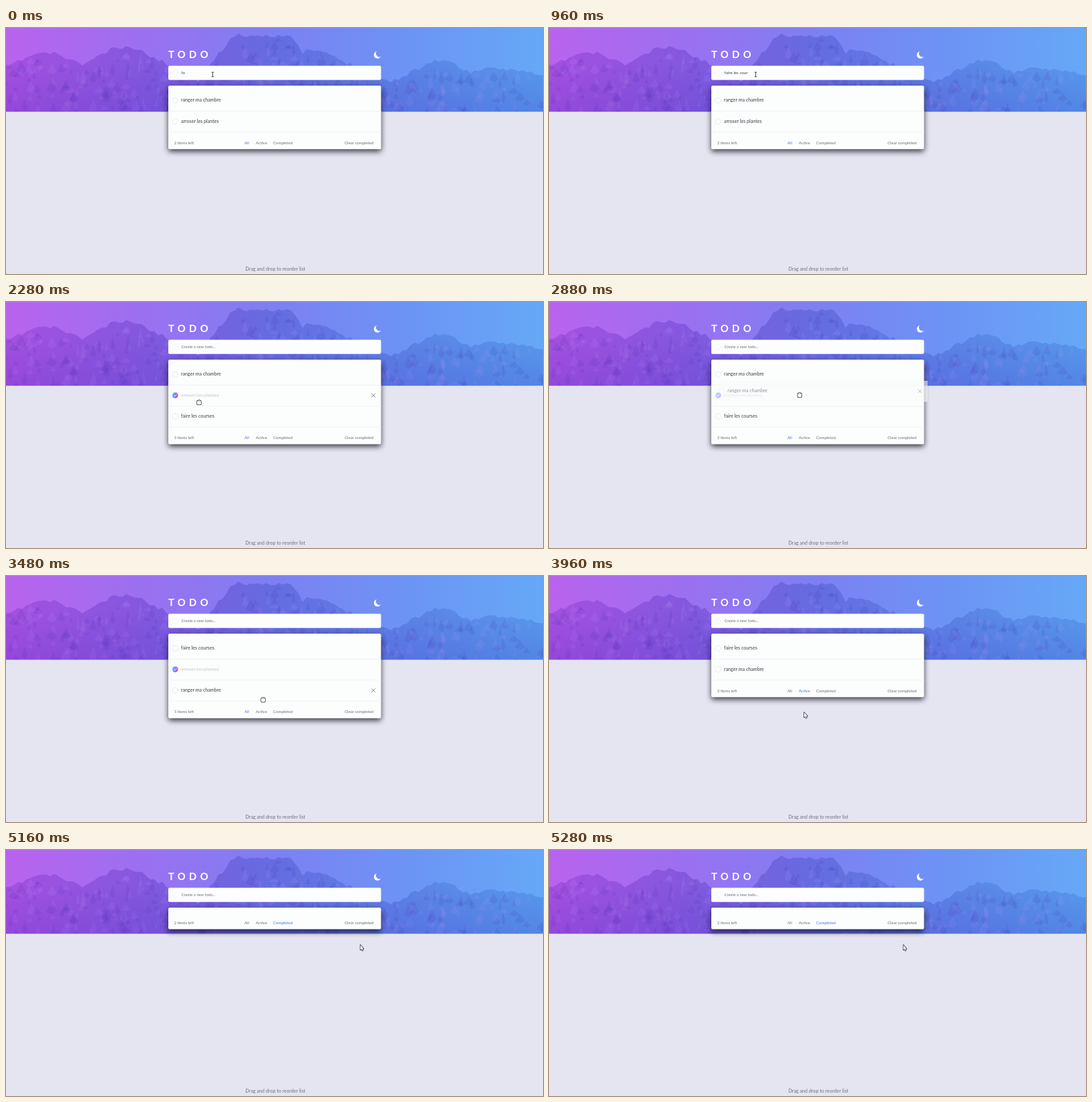
These frames come from a looping animation (804 px wide and 368 px high, 5.4 s). An HTML page with a canvas:

```html
<!DOCTYPE html>
<html lang="en">
<head>
<meta charset="utf-8">
<title>Todo</title>
<style>
html, body { margin: 0; width: 100%; height: 100%; overflow: hidden; background: #e4e5f1; }
canvas { display: block; width: 804px; height: 368px; }
</style>
</head>
<body>
<canvas id="stage"></canvas>
<script>
const W = 804, H = 368, LOOP = 5400, STEP = 120;
const LEFT = 243, RIGHT = 561.5, ROW = 31.4, LIST = 93, SKY = 125.3;
const FONT = 'Lato, "Open Sans", sans-serif';
const INK = '#3c3e49', SOFT = '#6c6e7b', BLUE = '#4777d6', DARK = '#24252b';
const room = { text: 'ranger ma chambre' };
const plants = { text: 'arroser les plantes' };
const shop = { text: 'faire les courses' };

// Moments of each user action, in ms
const AT = { submit: 1320, check: 2040, grab: 2640, drop: 3240, active: 3840, completed: 4560, clear: 5160 };

const HOME = [309.5, 69.5];
// Pointer moves: start, end, then where to
const MOVES = [
  [1560, 1920, 253, 139], [2160, 2280, 289, 150], [2280, 2640, 370, 114], [2640, 3240, 385, 185],
  [3600, 3720, 382, 204], [4080, 4320, 413.5, 172.5], [4680, 5040, 530.5, 142]
];
const LINKS = [['All', 357], ['Active', 374], ['Completed', 400], ['Clear completed', 507]];
// Peaks: centre, top, half width of the flat top, steepness
const PEAKS = [[60, 38, 15, 0.45], [178, 30, 15, 0.5], [382, 11, 42, 1.3], [460, 34, 10, 0.45],
  [650, 48, 8, 0.5], [740, 62, 30, 0.3]];

const stage = document.getElementById('stage');
const ratio = window.devicePixelRatio || 1;

function setUp(canvas) {
  canvas.width = W * ratio;
  canvas.height = H * ratio;
  const c = canvas.getContext('2d');
  c.scale(ratio, ratio);
  c.lineJoin = c.lineCap = 'round';
  return c;
}
const ctx = setUp(stage);
const backdrop = document.createElement('canvas');

function ramp(c, x0, y0, x1, y1, colors) {
  const g = c.createLinearGradient(x0, y0, x1, y1);
  colors.forEach((col, i) => g.addColorStop(i / (colors.length - 1), col));
  return g;
}

function label(c, str, x, y, size, color, weight = 400, spacing = 0) {
  c.font = `${weight} ${size}px ${FONT}`;
  c.fillStyle = color;
  c.letterSpacing = spacing + 'px';
  c.fillText(str, x, y);
  c.letterSpacing = '0px';
}

function line(color, width, x0, y0, x1, y1) {
  ctx.beginPath();
  ctx.moveTo(x0, y0);
  ctx.lineTo(x1, y1);
  ctx.strokeStyle = color;
  ctx.lineWidth = width;
  ctx.stroke();
}

function ring(x, y, color) {
  ctx.beginPath();
  ctx.arc(x, y, 4.1, 0, Math.PI * 2);
  ctx.strokeStyle = color;
  ctx.lineWidth = 0.7;
  ctx.stroke();
}

function panel(top, bottom, shadow) {
  ctx.save();
  if (shadow) {
    ctx.shadowColor = 'rgba(12,12,20,.8)';
    ctx.shadowBlur = 9 * ratio;
    ctx.shadowOffsetY = 3.5 * ratio;
  }
  ctx.fillStyle = '#fcfdfd';
  ctx.beginPath();
  ctx.roundRect(LEFT, top, RIGHT - LEFT, bottom - top, 2);
  ctx.fill();
  ctx.restore();
}

function skyline(x) {
  return Math.min(SKY, ...PEAKS.map(([px, top, half, steep]) =>
    top + Math.max(0, Math.abs(x - px) - half) * steep));
}

function paintBackdrop() {
  const c = setUp(backdrop);
  let seed = 11;
  const rnd = () => (seed = seed * 16807 % 2147483647) / 2147483647;
  c.fillStyle = '#e4e5f1';
  c.fillRect(0, 0, W, H);
  c.fillStyle = ramp(c, 0, 0, W, 0, ['#b963ee', '#9c70f0', '#7d80f2', '#6c94f5', '#66a8f7']);
  c.fillRect(0, 0, W, SKY);

  c.save();
  c.beginPath();
  c.moveTo(0, SKY);
  for (let x = 0; x <= W; x += 6) c.lineTo(x, skyline(x) + (rnd() - 0.5) * 6);
  c.lineTo(W, SKY);
  c.clip();
  c.fillStyle = ramp(c, 0, 0, W, 0, ['#a550df', '#8458de', '#656ce0', '#5c84e6', '#579aec']);
  c.fillRect(0, 0, W, SKY);
  // Craggy streaks, shaded and lit
  for (let i = 0; i < 420; i++) {
    const x = rnd() * W, y = skyline(x) + rnd() * 85, w = 2 + rnd() * 6, h = 5 + rnd() * 17;
    c.fillStyle = rnd() < 0.55 ? 'rgba(50,30,160,.1)' : 'rgba(200,170,255,.1)';
    c.beginPath();
    c.moveTo(x, y);
    c.lineTo(x + w, y + h * 0.7);
    c.lineTo(x + w * 0.3, y + h);
    c.lineTo(x - w, y + h * 0.8);
    c.fill();
  }
  c.fillStyle = ramp(c, 0, 50, 0, SKY, ['rgba(60,30,190,0)', 'rgba(60,30,190,.16)']);
  c.fillRect(0, 0, W, SKY);
  c.restore();

  label(c, 'TODO', 243, 44.6, 14.8, '#fff', 700, 5.3);
  c.fillStyle = '#fff';
  c.fill(new Path2D('M555 35.1A5.4 5.4 0 1 0 561 42.8A5 5 0 0 1 555 35.1'));
  label(c, 'Drag and drop to reorder list', 358.5, 362.5, 7, SOFT, 400, 0.08);
}

function listAt(t) {
  if (t < AT.submit) return [room, plants];
  if (t < AT.drop) return [room, plants, shop];
  if (t < AT.active) return [shop, plants, room];
  if (t < AT.completed) return [shop, room];
  return t < AT.clear ? [plants] : [];
}

function pointerAt(t) {
  return MOVES.reduce(([x, y], [from, to, tx, ty]) => {
    const k = Math.min(1, Math.max(0, (t - from) / (to - from)));
    const e = k * k * (3 - 2 * k);
    return [x + (tx - x) * e, y + (ty - y) * e];
  }, HOME);
}

function drawRow(item, y, done, hover) {
  if (done) {
    ctx.fillStyle = ramp(ctx, 249.5, y - 2, 257, y + 2, ['#4fc3fb', '#7f7df6', '#c354ee']);
    ctx.beginPath();
    ctx.arc(253.3, y, 4.4, 0, Math.PI * 2);
    ctx.fill();
    line('#fff', 0.8, 251.5, y + 0.1, 252.8, y + 1.4);
    line('#fff', 0.8, 252.8, y + 1.4, 255.3, y - 1.4);
  } else {
    ring(253.3, y, '#e1e2ea');
  }
  label(ctx, item.text, 262, y + 2.1, 7.1, done ? '#d3d5dc' : INK);
  if (done) line('#d3d5dc', 0.6, 262, y, 262 + ctx.measureText(item.text).width, y);
  if (hover) for (const s of [-2.7, 2.7]) line('#6b6d7c', 0.8, 550 - s, y - 2.6, 550 + s, y + 2.8);
}

function icon(x, y, path) {
  ctx.save();
  ctx.translate(x, y);
  ctx.strokeStyle = DARK;
  ctx.lineWidth = 1.4;
  ctx.stroke(path);
  ctx.fillStyle = '#fff';
  ctx.fill(path);
  ctx.restore();
}

// Palm with fingers of the given lengths
function hand(lengths) {
  const p = new Path2D();
  p.roundRect(-3, -0.5, 6, 4, 1.8);
  lengths.forEach((len, i) => p.roundRect(-2.9 + i * 1.5, -len, 1.3, len + 1, 0.6));
  return p;
}
const openHand = hand([2.3, 3, 3, 2.3]);
const pointHand = hand([1, 5, 1.4, 1]);
const arrow = new Path2D('M0 0V7.6L1.7 6.1L2.9 8.7L4 8.2L2.9 5.7H5Z');

const cursors = {
  text(x, y) {
    line(DARK, 0.8, x, y - 3, x, y + 3);
    for (const s of [-3.3, 3.3]) line(DARK, 0.8, x - 1.4, y + s, x + 1.4, y + s);
  },
  arrow: (x, y) => icon(x, y, arrow),
  point: (x, y) => icon(x + 0.8, y + 5, pointHand),
  grab: (x, y) => icon(x, y, openHand)
};

function overLink(x, y, footY) {
  ctx.font = `400 6.05px ${FONT}`;
  return Math.abs(y - footY) < 6 &&
    LINKS.some(([name, at]) => x >= at && x <= at + ctx.measureText(name).width);
}

function cursorKind(x, y, footY, row) {
  if (y < 78) return 'text';
  if (overLink(x, y, footY)) return 'point';
  if (row < 0) return 'arrow';
  return Math.abs(x - 253.3) < 5 ? 'point' : 'grab';
}

function draw(t) {
  const items = listAt(t), n = items.length;
  const footY = 108.7 + ROW * n;
  const [px, py] = pointerAt(t);
  const row = Math.floor((py - LIST) / ROW);
  const hovered = row >= 0 && row < n ? row : -1;
  const dragging = t > AT.grab && t < AT.drop;
  const filter = t < AT.active ? 0 : t < AT.completed ? 1 : 2;

  ctx.drawImage(backdrop, 0, 0, W, H);

  panel(56.5, 77.7, false);
  ring(253, 67.5, '#f1f2f6');
  if (t < AT.submit) label(ctx, shop.text.slice(0, 2 + Math.floor(t / 75)), 262.7, 69.4, 6.2, INK);
  else label(ctx, 'Create a new todo...', 262.7, 69.3, 5.8, SOFT);

  panel(86.2, 118.5 + ROW * n, true);
  items.forEach((item, i) => {
    const edge = LIST + ROW * (i + 1);
    drawRow(item, 108.3 + ROW * i, item === plants && t >= AT.check, i === hovered && !dragging);
    line('#eeeff3', 0.8, LEFT, edge, RIGHT, edge);
  });

  const left = t >= AT.submit && t < AT.clear ? 3 : 2;
  label(ctx, left + ' items left', 251.7, footY + 2, 6.05, SOFT);
  LINKS.forEach(([name, x], i) => label(ctx, name, x, footY + 2, 6.05, i === filter ? BLUE : SOFT));

  if (dragging) {
    const [gx, gy] = pointerAt(AT.grab);
    ctx.save();
    ctx.globalAlpha = 0.55;
    ctx.translate(px - gx, py - gy);
    ctx.fillStyle = '#fcfdfd';
    ctx.fillRect(LEFT, LIST, RIGHT - LEFT, ROW);
    drawRow(room, 108.3, false, true);
    ctx.restore();
  }
  cursors[cursorKind(px, py, footY, hovered)](px, py);
}

paintBackdrop();
const start = performance.now();
let shown = -1;
function tick() {
  const t = Math.floor(((performance.now() - start) % LOOP) / STEP) * STEP;
  if (t !== shown) draw(shown = t);
  requestAnimationFrame(tick);
}
tick();
</script>
</body>
</html>
```
